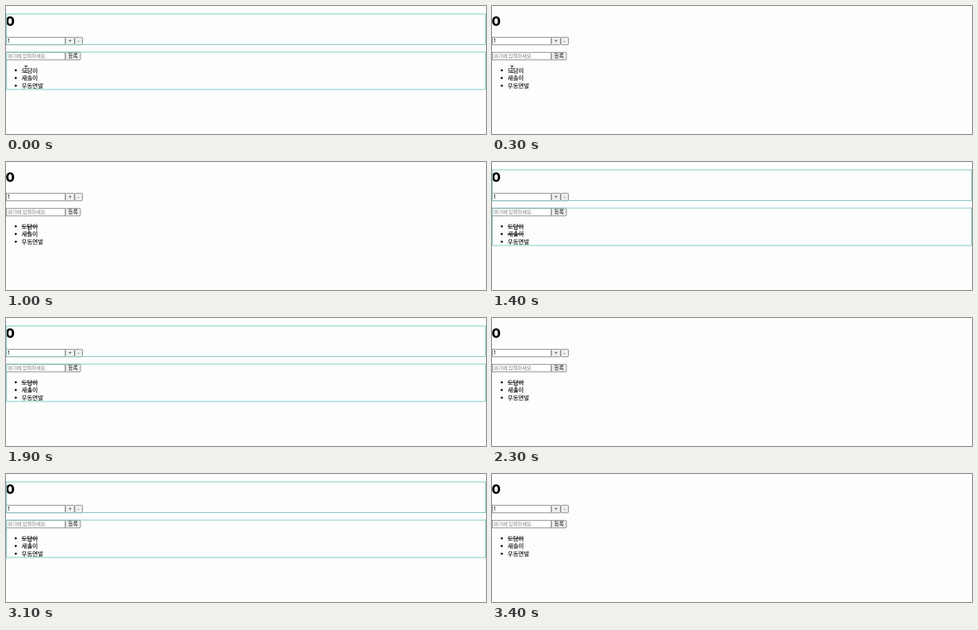
An HTML page for the animation above (6000 ms loop, 600 px wide and 161 px high).

```html
<!DOCTYPE html>
<html>
<head>
<meta charset="utf-8">
<style>
  html, body { margin: 0; width: 100%; height: 100%; overflow: hidden; background: #fdfdfd; }
  svg { display: block; }
  text { font-family: "Noto Sans CJK KR", "Noto Sans CJK JP", sans-serif; font-size: 7.3px; fill: #000; }
  .count { font: 800 16.5px Inter, sans-serif; }
  .value { font: 6.4px Inter, sans-serif; }
  .label { font-size: 6.5px; font-weight: 500; text-anchor: middle; }
  .hint { font-size: 6.2px; fill: #777; }
  .item { stroke: #000; stroke-width: .12; }
  .strike { stroke: #000; stroke-width: .8; }
  .field, .button { stroke: #858585; stroke-width: .9; }
  .field { fill: #fff; }
  .button { fill: #efefef; }
  .outline { fill: none; stroke: #85cbc6; }
</style>
</head>
<body>
<svg width="600" height="161" viewBox="0 0 600 161">
  <text class="count" x="-.4" y="25.3">0</text>
  <g id="form"></g>
  <g id="list"></g>
  <g id="outline">
    <rect class="outline" x=".5" y="10" width="599" height="38.5"/>
    <rect class="outline" x=".5" y="58" width="599" height="47"/>
  </g>
  <path id="cursor" d="M-2 0H2M0 0V8M-2 8H2" fill="none" stroke="#333" stroke-width=".9"/>
</svg>
<script>
  const LOOP = 6000, STEP = 100;
  const $ = id => document.getElementById(id);
  const show = (el, on) => el.setAttribute("visibility", on ? "visible" : "hidden");

  const box = (kind, x, y, w) =>
    `<rect class="${kind}" x="${x}" y="${y}" width="${w}" height="9.5" rx="${kind === "button" ? 1 : 0}"/>`;
  const field = (y, kind, text) =>
    box("field", .4, y, 73.6) + `<text class="${kind}" x="2" y="${y + 7.1}">${text}</text>`;
  const button = (x, y, w, text) =>
    box("button", x, y, w) + `<text class="label" x="${x + w / 2}" y="${y + 7.1}">${text}</text>`;

  $("form").innerHTML =
    field(39.3, "value", "1") + button(74.5, 39.3, 11, "+") + button(86, 39.3, 9.5, "-") +
    field(58.3, "hint", "여기에 입력하세요.") + button(74.5, 58.3, 18.5, "등록");

  $("list").innerHTML = ["도담이", "새솔이", "우동면발"].map((name, i) => {
    const y = 80.9 + i * 9.7;
    return `<circle cx="12.2" cy="${y}" r="1.3"/>
      <text class="item" x="19.5" y="${y + 2.6}">${name}</text>
      <line class="strike" x1="19.5" x2="39.7" y1="${y}" y2="${y}"/>`;
  }).join("");
  const strikes = document.querySelectorAll(".strike");

  // Every click toggles one item and flashes the outlines; the first flash is the initial render.
  const clicks = [
    { at: 0, flash: 300 },
    { at: 600, flash: 300, item: 0 },
    ...[1400, 1900, 2500, 3100].map(at => ({ at, flash: 200, item: 1 }))
  ];
  const EXIT = 3300;

  const progress = (t, from, to) => Math.min(1, Math.max(0, (t - from) / (to - from)));

  function draw(t) {
    const past = clicks.filter(click => click.at <= t);
    const last = past[past.length - 1];
    show($("outline"), t < last.at + last.flash);
    strikes.forEach((line, i) => show(line, past.filter(click => click.item === i).length % 2));

    const move = progress(t, 800, 1100);
    const leave = progress(t, EXIT - STEP, EXIT);
    const x = 25 + 5 * move + 2 * leave;
    const y = 75.5 + 9 * move + 15.5 * leave;
    $("cursor").setAttribute("transform", `translate(${x} ${y})`);
    show($("cursor"), t < EXIT + STEP);
  }

  const start = performance.now();
  function tick() {
    const t = (performance.now() - start) % LOOP;
    draw(Math.floor(t / STEP) * STEP);
    requestAnimationFrame(tick);
  }
  tick();
</script>
</body>
</html>
```
